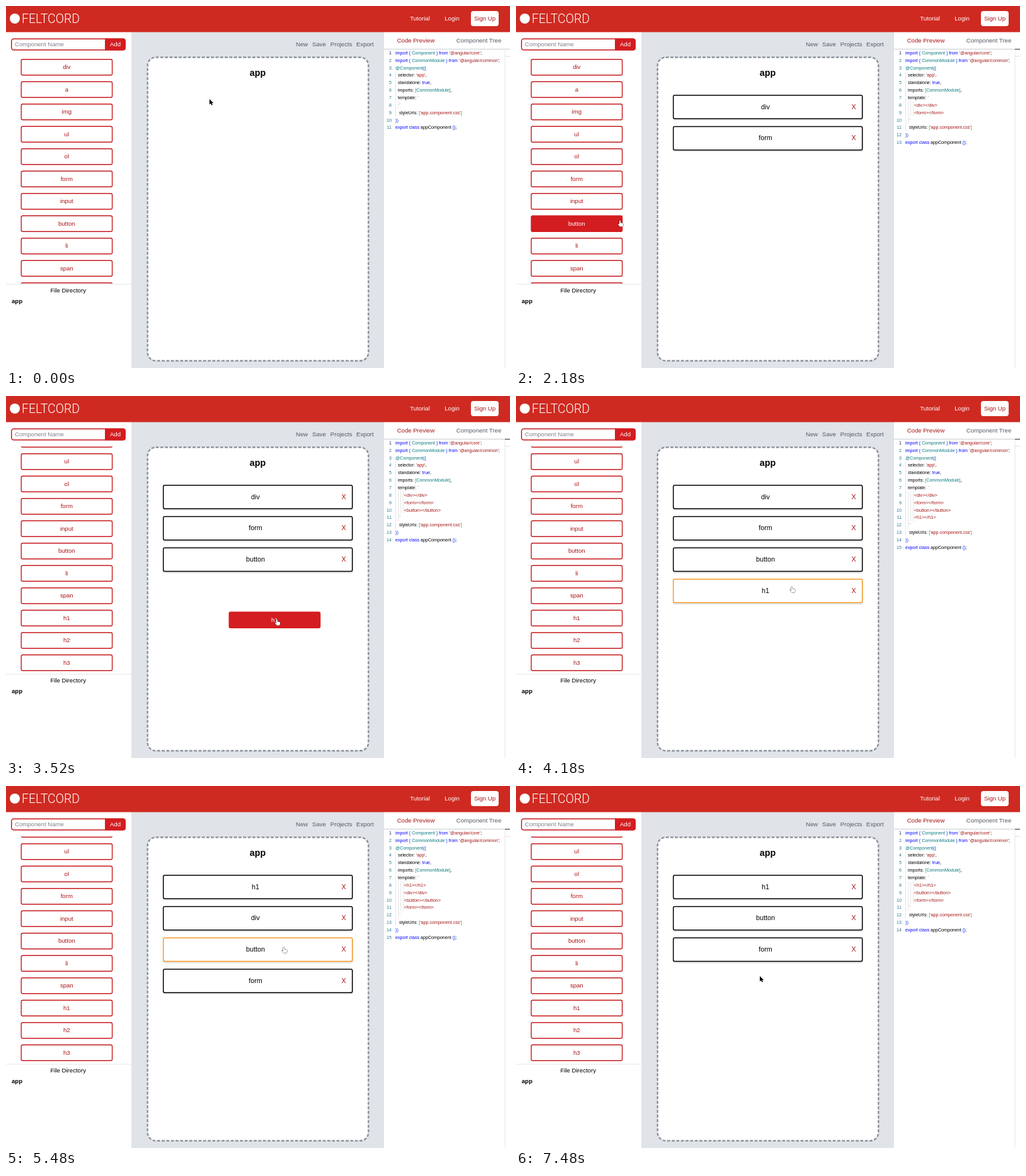
Write an HTML page that moves like this. It is 800x575 px and loops after 7760 ms.

```html
<!DOCTYPE html>
<html lang="en">
<head>
<meta charset="utf-8">
<title>Component builder</title>
<style>
html, body { margin: 0; width: 100%; height: 100%; overflow: hidden; background: #fff; }
svg { display: block; width: 800px; height: 575px; }
text { font: 9.6px "Liberation Sans", Arial, sans-serif; white-space: pre; }
.code { font-size: 7.13px; }
.item { font-size: 10.8px; }
.brand { font: 300 19.5px Roboto, sans-serif; }
</style>
</head>
<body>
<svg viewBox="0 0 800 575">
  <defs><clipPath id="list"><rect y="80" width="199" height="361"/></clipPath></defs>
  <g id="base"></g>
  <g id="live"></g>
</svg>
<script>
const LOOP = 7760, PITCH = 49.75, ROW = 35.5;
const RED = '#d41d20', EDGE = '#c6191c', INK = '#ab1416', GREY = '#555b65';
const names = 'div a img ul ol form input button li span h1 h2 h3'.split(' ');

// Cursor path: time, x, y
const path = [
  [0, 323, 148], [520, 323, 148], [750, 151, 96], [800, 151, 96], [1030, 382, 165],
  [1120, 395, 172], [1270, 300, 342], [1440, 150, 272], [1480, 150, 272], [1760, 400, 225],
  [1800, 400, 225], [2060, 166, 383], [2170, 164, 341], [2200, 164, 341], [2460, 400, 300],
  [2500, 400, 300], [2680, 250, 508], [2880, 99, 400], [3100, 99, 352], [3160, 99, 352],
  [3520, 429, 355], [3660, 435, 350], [3850, 360, 508], [4030, 437, 303], [4190, 437, 303],
  [4560, 437, 153], [4740, 437, 153], [4960, 440, 303], [4980, 440, 303], [5300, 440, 253],
  [5480, 440, 256], [5670, 440, 256], [5980, 537.5, 208], [6430, 537.5, 208], [6780, 387, 302],
  [LOOP, 387, 302]
];
// Canvas contents from each time on
const contents = [
  [0, ''], [1120, 'div'], [1780, 'div form'], [2480, 'div form button'],
  [3600, 'div form button h1'], [4600, 'h1 div form button'],
  [5320, 'h1 div button form'], [7000, 'h1 button form']
];
// Drags: start, end, name
const pulls = [[800, 1120, 'div'], [1480, 1780, 'form'], [2200, 2480, 'button'], [3160, 3600, 'h1']];
const sorts = [[4190, 4600, 'h1'], [4980, 5320, 'button']];
const OPEN = 6080, CLOSE = 7000;

const clamp = v => Math.max(0, Math.min(1, v));
const ease = v => (v = clamp(v), v * v * (3 - 2 * v));
const ramp = (t, from, to) => ease((t - from) / (to - from));
const active = (spans, t) => spans.find(([from, to]) => t >= from && t < to);
const inside = ([px, py], x, y, w, h) => px >= x && px < x + w && py >= y && py < y + h;

function cursorAt(t) {
  const i = Math.max(1, path.findIndex(p => p[0] > t));
  const [a, x, y] = path[i - 1], [b, u, v] = path[i];
  const k = ramp(t, a, b);
  return [x + (u - x) * k, y + (v - y) * k];
}

const rect = (x, y, w, h, fill, more = '') =>
  `<rect x="${x}" y="${y}" width="${w}" height="${h}" fill="${fill}" ${more}/>`;
const text = (x, y, s, fill = '#000', more = '') =>
  `<text x="${x}" y="${y}" fill="${fill}" ${more}>${s}</text>`;
const mid = (x, y, s, fill, more = '') => text(x, y, s, fill, 'text-anchor="middle" ' + more);

function drawBase() {
  return rect(0, 0, 800, 575, '#fff') + rect(199, 41, 401, 534, '#e0e3e8')
    + rect(0, 0, 800, 41.5, '#cf2a21')
    + '<circle cx="14" cy="20" r="8" fill="#fff"/>'
    + text(25, 27, 'FELTCORD', '#fff', 'class="brand"')
    + mid(657, 23.4, 'Tutorial', '#fff') + mid(708, 23.4, 'Login', '#fff')
    + rect(738, 8, 44, 24, '#fff', 'rx="4"') + mid(760, 23.4, 'Sign Up', INK)
    + rect(8.7, 52.2, 180.2, 17.6, '#fff', `rx="3.5" stroke="${EDGE}" stroke-width="1.5"`)
    + text(14, 64.3, 'Component Name', '#7c828c')
    + `<path d="M157 51.5h29a4 4 0 0 1 4 4v11a4 4 0 0 1-4 4h-29z" fill="${RED}"/>`
    + mid(173.5, 64.3, 'Add', '#fff')
    + rect(0, 441.5, 199, 1, '#e5e7eb') + mid(98.7, 455, 'File Directory')
    + text(9, 471.6, 'app', '#000', 'style="font-weight:bold"')
    + text(460, 64.3, 'New', GREY) + text(486, 64.3, 'Save', GREY)
    + text(514.8, 64.3, 'Projects', GREY) + text(556, 64.3, 'Export', GREY)
    + rect(224.7, 81.5, 350.6, 482, '#fff',
        'rx="13" stroke="#8e939c" stroke-width="2.4" stroke-dasharray="4.8 2.5"')
    + mid(399.5, 111, 'app', '#000', 'style="font-size:14.3px;font-weight:bold"')
    + mid(650.5, 58.3, 'Code Preview', INK) + mid(750.5, 58.3, 'Component Tree', GREY)
    + rect(600, 68, 200, 1, '#c9ccd1') + rect(791.5, 69, 1, 506, '#e8e8e8')
    + rect(792, 79.5, 8, 1, '#dcdcdc');
}

const tokens = /('[^']*'|`|<.*>)|\b(import|from|export|class|true)\b|(@?\bComponent\b|@Component|CommonModule)|([{}()])|([[\]])/g;
const colors = ['#a31515', '#0000ff', '#087a80', '#0431fa', '#319331'];
const paint = line => line.replace(tokens, (s, ...groups) =>
  `<tspan fill="${colors[groups.slice(0, 5).findIndex(Boolean)]}">${s.replace(/</g, '&lt;')}</tspan>`);

function drawCode(items) {
  const lines = [
    "import { Component } from '@angular/core';",
    "import { CommonModule } from '@angular/common';",
    '@Component({', "  selector: 'app',", '  standalone: true,',
    '  imports: [CommonModule],', '  template: `',
    ...items.map(n => `       <${n}></${n}>`),
    '   `', "   styleUrls: ['app.component.css']", '})', 'export class appComponent {};'
  ];
  const n = items.length, top = i => 68.2 + 11.86 * i;
  const guide = (x, from, count) => rect(x, top(from), .6, 11.86 * count, '#d3d3d3');
  let out = guide(618, 3, n + 6) + guide(622.5, 7, n + 1);
  // Guides inside the template, and the mark in the overview ruler
  if (n) out += guide(626.5, 7, n) + guide(630, 7, n) + rect(792, 68, 8, 1.2, '#444');
  return out + lines.map((line, i) =>
    text(612, top(i) + 8.6, i + 1, i ? '#237893' : '#0b216f', 'class="code" text-anchor="end"')
    + text(618, top(i) + 8.6, paint(line), '#000', 'class="code"')).join('');
}

function drawButton(x, y, name, filled) {
  return rect(x + .7, y + .7, 144.4, 25, filled ? RED : '#fff',
      `rx="2.2" stroke="${filled ? RED : EDGE}" stroke-width="1.4"`)
    + mid(x + 72.8, y + 16.4, name, filled ? '#fff' : INK);
}

function drawItem(y, name, hot) {
  return rect(249, y + 2, 302, 39, '#000', 'rx="3" opacity=".1"')
    + rect(249.7, y + .7, 300, 37.2, '#fff', `rx="2.2" stroke="${hot ? '#f59a23' : '#000'}" stroke-width="1.5"`)
    + mid(396, y + 22.7, name, '#000', 'class="item"') + mid(536.2, y + 22.7, 'X', INK, 'class="item"');
}

function drawItems(items, t, pos, idle) {
  const sort = active(sorts, t);
  const from = sort ? items.indexOf(sort[2]) : -1;
  const shift = sort ? (pos[1] - cursorAt(sort[0])[1]) / PITCH : 0;
  const at = from + shift;
  let hot = false, top = '';
  const out = items.map((name, i) => {
    if (i === from) {
      hot = true;
      top = drawItem(141 + PITCH * at, name, true);
      return '';
    }
    const slot = i < from ? i + ease((i + .5 - at) * 3 + .5) : i;
    const y = 141 + PITCH * slot;
    const over = idle && !sort && inside(pos, 249, y, 301, 38);
    hot = hot || over;
    return drawItem(y, name, over);
  }).join('');
  return [out + top, hot];
}

function drawCursor([x, y], hand) {
  const d = hand
    ? 'M0 .8q0-1 .9-1t.9 1v2.5l3.4.8q1.2.3 1 1.6l-.5 2.2-.9 1.6h-3.6L-2 6.2q-.5-1 .4-1.3l1.6 1z'
    : 'M0 0v8.6l2-1.8 1.4 3 1.5-.7-1.4-2.9h2.8z';
  const [fill, line] = hand ? ['#fff', '#000'] : ['#000', '#fff'];
  return `<path d="${d}" transform="translate(${x} ${y})" fill="${fill}" stroke="${line}" stroke-width=".8" paint-order="stroke"/>`;
}

function drawDialog(k) {
  return `<g opacity="${k}">` + rect(0, 0, 800, 575, '#000', 'opacity=".47"')
    + rect(343.5, 255, 113.5, 66.3, '#fff', 'rx="3"') + mid(399.7, 274.6, 'Delete div?')
    + rect(367.5, 296, 25.6, 14.6, RED, 'rx="2.5"') + mid(380.2, 306.8, 'Yes', '#fff')
    + mid(421.4, 306.8, 'No', INK) + '</g>';
}

function draw(t) {
  const pos = cursorAt(t);
  const items = contents.filter(c => c[0] <= t).pop()[1].split(' ').filter(Boolean);
  const pull = active(pulls, t);
  const modal = t >= OPEN && t < CLOSE + 150;
  const idle = !pull && !modal;
  const listTop = s => 84 - 99.5 * ramp(s, 2880, 3080);
  let hand = !!pull;

  const list = names.map((name, i) => {
    const y = listTop(t) + ROW * i;
    const over = idle && pos[1] < 441 && inside(pos, 23.5, y, 145.8, 26.4);
    hand = hand || over;
    return drawButton(23.5, y, name, over);
  }).join('');
  const [board, hot] = drawItems(items, t, pos, idle);
  let out = `<g clip-path="url(#list)">${list}</g>` + drawCode(items) + board;

  if (pull) {
    const [start, , name] = pull, [gx, gy] = cursorAt(start);
    out += drawButton(23.5 + pos[0] - gx, listTop(start) + ROW * names.indexOf(name) + pos[1] - gy, name, true);
  }
  if (modal) {
    out += drawDialog(ramp(t, OPEN, OPEN + 150) * (1 - ramp(t, CLOSE, CLOSE + 150)));
    hand = t < CLOSE && inside(pos, 367.5, 296, 25.6, 14.6);
  }
  return out + drawCursor(pos, hand || hot);
}

const live = document.getElementById('live');
document.getElementById('base').innerHTML = drawBase();
const begin = performance.now();
function tick() {
  live.innerHTML = draw((performance.now() - begin) % LOOP);
  requestAnimationFrame(tick);
}
tick();
</script>
</body>
</html>
```
